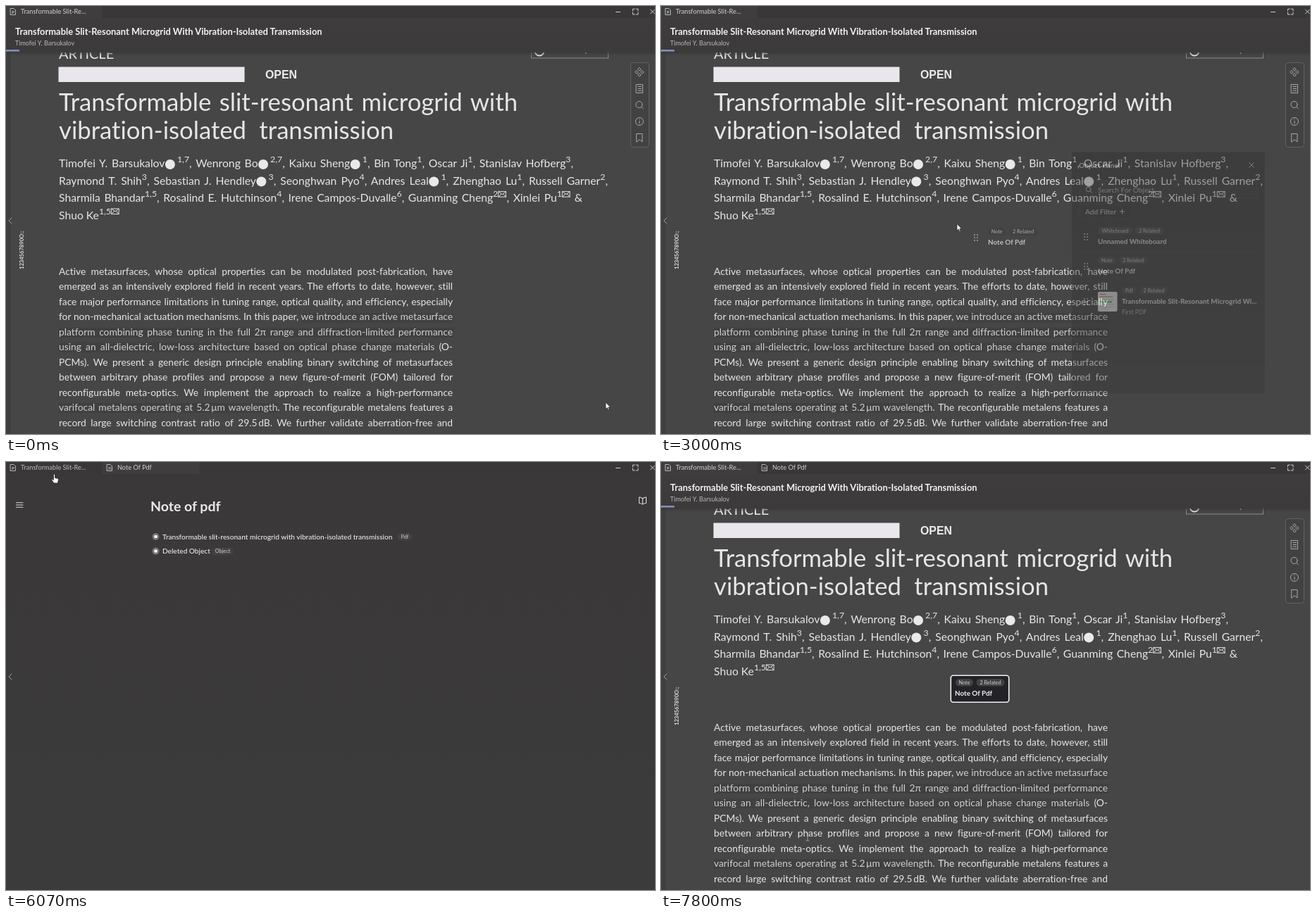
Write an HTML page that moves like this. It is 921 by 608 pixels and loops after 7.94 s.

```html
<!DOCTYPE html>
<html lang="en">
<head>
<meta charset="utf-8">
<title>Document notes</title>
<style>
  html, body { margin: 0; width: 100%; height: 100%; overflow: hidden; background: #3b393a; }
  svg { display: block; width: 100vw; height: 100vh; font-family: Lato, "Open Sans", sans-serif; font-variant-ligatures: none; }
  .line { fill: none; stroke-linecap: round; stroke-linejoin: round; }
</style>
</head>
<body>
<svg id="stage" viewBox="0 0 921 608" preserveAspectRatio="none"></svg>
<script>
const LOOP = 7940, FPS = 15;
const stage = document.getElementById('stage');
const titleCase = 'Transformable Slit-Resonant Microgrid With Vibration-Isolated Transmission';
const author = 'Timofei Y. Barsukalov';

// Drawing helpers
const text = (x, y, size, str, fill = '#e6e6e6', weight = 400, more = '') =>
  `<text x="${x}" y="${y}" font-size="${size}" fill="${fill}" font-weight="${weight}" ${more}>${str}</text>`;
const rect = (x, y, w, h, fill, more = '') =>
  `<rect x="${x}" y="${y}" width="${w}" height="${h}" fill="${fill}" ${more}/>`;
const line = (d, color = '#b4b4b4', w = 1) =>
  `<path class="line" d="${d}" stroke="${color}" stroke-width="${w}"/>`;
const circle = (x, y, r, fill) => `<circle cx="${x}" cy="${y}" r="${r}" fill="${fill}"/>`;
const group = (id, body) => `<g id="${id}">${body}</g>`;

const chip = (x, y, w, str) => rect(x, y, w, 10.5, '#434143', 'rx="5.2"') +
  text(x + w / 2, y + 7.8, 7.3, str, '#d2d2d2', 400, 'text-anchor="middle"');
const chips = (x, y, kind, w) => chip(x, y, w, kind) + chip(x + w + 4.5, y, 40, '2 Related');
const dots = (x, y) => [-4, 0, 4].map(d =>
  circle(x - 2, y + d, 1, '#c8c8c8') + circle(x + 2, y + d, 1, '#c8c8c8')).join('');
const cross = (x, y, r, color) =>
  line(`M${x - r} ${y - r}l${2 * r} ${2 * r}m0 ${-2 * r}l${-2 * r} ${2 * r}`, color);
const lens = (x, y, r, color) =>
  line(`M${x + r} ${y}a${r} ${r} 0 1 0 ${-2 * r} 0a${r} ${r} 0 1 0 ${2 * r} 0M${x + r * .7} ${y + r * .7}l2.6 2.6`, color);
const sheet = (x, y) => line(`M${x - 3.5} ${y - 4.5}h4.5l2.5 2.5v6.5h-7z`, '#c4c4c4', .9);

function paper() {
  return rect(0, 17, 921, 591, '#464646') + rect(0, 66, 7, 542, '#403f3f') +
    text(75, 75, 20, 'ARTICLE') +
    rect(745.5, 55, 109, 19, 'none', 'stroke="#8a8a8a"') +
    line('M750.5 64a6.5 6.5 0 0 0 13 0', '#e6e6e6', 2) + rect(822, 66, 1.3, 2, '#ccc') +
    rect(74.5, 86.5, 264, 21.5, '#e9e7ec') +
    text(368, 103, 15.9, 'OPEN', '#ececec', 700, 'font-family="Liberation Sans, sans-serif"') +
    rect(419, 436, 216, 14, '#000', 'opacity=".07"') +
    rect(75, 457, 560, 14, '#000', 'opacity=".09"') +
    rect(75, 478, 533, 14, '#000', 'opacity=".07"') +
    rect(75, 564, 311, 14, '#000', 'opacity=".09"') +
    group('column', '') +
    `<g transform="translate(24.5 374) rotate(-90)">${text(0, 0, 7.6, '1234567890O:;', '#dcdcdc', 700)}</g>`;
}

function sideTools() {
  const c = '#a9a9a9';
  const diamond = (x, y) => `M${x} ${y - 2.2}l2.2 2.2l-2.2 2.2l-2.2 -2.2z`;
  return rect(886.5, 80.5, 26, 120, '#434242', 'rx="4" stroke="#646363"') +
    line(diamond(899, 90) + diamond(899, 98) + diamond(895, 94) + diamond(903, 94), c) +
    line('M894.5 111.5h9v12h-9zM897 114.5h4.5M897 117.5h4.5M897 120.5h4.5', c) +
    lens(898.5, 140, 4.6, c) +
    line('M904.5 164a5.5 5.5 0 1 0-11 0a5.5 5.5 0 1 0 11 0M899 163.5v3.3M899 161v.2', c) +
    line('M895 181.5h8v11.5l-4 -3.3l-4 3.3z', c);
}

function header() {
  return rect(0, 17, 921, 49, 'url(#head)') + rect(0, 66, 921, 5, 'url(#shade)') +
    text(13, 41, 12.9, titleCase, '#f2f2f2', 700) +
    text(13, 55.5, 9, author, '#b9b7b8') +
    rect(0, 62, 19, 2.6, '#8090b8');
}

function notePage() {
  const item = (y, str) => circle(212.5, y, 5, '#777576') + circle(212.5, y, 2.3, '#fff') +
    text(222, y + 3.6, 10.1, str, '#ececec', 500);
  return rect(0, 17, 921, 591, 'url(#noteBg)') + group('noteBody',
    line('M14.5 57.7h9.5M14.5 61h9.5M14.5 64.3h9.5', '#d8d8d8', 1.1) +
    line('M903.5 52q-2-2-5-2v8.5q3 0 5 1.6q2-1.6 5-1.6v-8.5q-3 0-5 2v8', '#d8d8d8', 1.1) +
    text(205, 70, 19.5, 'Note of pdf', '#e8e8ec', 700) +
    item(106, 'Transformable slit-resonant microgrid with vibration-isolated transmission') +
    chip(555, 101, 22, 'Pdf') + item(126.6, 'Deleted Object') + chip(292, 121.5, 31, 'Object'));
}

function tabs() {
  const c = '#cfcfcf';
  return rect(0, 0, 921, 17, '#393738') + rect(0, 0, 137, 17, '#403d3e', 'id="tabLight"') +
    sheet(10, 8) + text(8.2, 11, 5.5, 'P', c, 700) +
    group('tabOne', text(21, 11.2, 9.2, 'Transformable Slit-Re...', '#d2d2d2')) +
    group('tabClose', cross(125, 8, 2.6, '#b8b8b8')) +
    group('tabTwo', sheet(147, 8) + line('M145.5 8h3.5M145.5 10h3.5', c, .8) +
      text(158, 11.2, 9.2, 'Note Of Pdf', c)) +
    line('M865.5 8.5h6', c) +
    line('M889.5 7v-2.8h2.8M894.2 4.2h2.8v2.8M897 9.2v2.8h-2.8M892.3 12h-2.8v-2.8', c) +
    cross(917.5, 8, 3, c);
}

const rowTitle = (x, y, str) => text(x, y, 9.9, str, '#efefef', 700);

function noteRow() {
  return dots(603, 370) + chips(620, 356.3, 'Note', 25.5) + rowTitle(620, 380.3, 'Note Of Pdf');
}

function panel() {
  return rect(583, 207.5, 274, 343, 'url(#panelBg)') +
    text(593, 229.5, 10.2, 'Object Panel', '#ededed', 700) + cross(838, 226, 3.4, '#d0d0d0') +
    rect(594.5, 248.5, 251.5, 25, '#353435', 'rx="3" stroke="#403f40"') +
    lens(606.5, 260.3, 3.4, '#d0d0d0') + text(620, 264.6, 10.2, 'Search For Object', '#c4c4c4') +
    rect(594.5, 281.5, 73, 21, '#2f2e2f', 'rx="3" stroke="#393839"') +
    text(602, 295.6, 10.2, 'Add Filter', '#e6e6e6') +
    line('M651.5 292h6M654.5 289v6', '#d8d8d8') +
    dots(603, 328) + chips(620, 314, 'Whiteboard', 48.5) +
    rowTitle(620, 338, 'Unnamed Whiteboard') +
    line('M594 348.8h252M594 391.2h252', '#403f40') +
    rect(594, 361, 18, 18, '#464546', 'rx="4" id="hover"') + noteRow() +
    dots(603, 420) + rect(620, 406, 27.5, 28, '#f4f4f4', 'rx="2"') +
    line('M623 409.5h8M623 413h18', '#b06a6a', 1.2) +
    line('M624 417h18M624 424h18M624 427.5h18M624 430.5h10', '#c0c0c0', .8) +
    rect(623, 419, 17, 2.5, '#52c452') +
    chips(654, 398.7, 'Pdf', 21) +
    rowTitle(654, 422.5, 'Transformable Slit-Resonant Microgrid Wi...') +
    text(654, 438, 8.5, 'First PDF', '#b8b8b8');
}

function card() {
  return rect(411.3, 303.3, 82.4, 38, '#232227', 'rx="3.5" stroke="#f1f1f3" stroke-width="1.6"') +
    chips(418, 308, 'Note', 25) + rowTitle(417, 332, 'Note Of Pdf') +
    group('cardTools', rect(463, 309, 44, 23, '#343336', 'rx="3"') +
      line('M467.5 317h6v6h-6zM470 314.5h6v6', '#c0c0c0') +
      line('M495.5 317l-5.5 3.5l5.5 3.5', '#c0c0c0') +
      circle(496, 317, 1.5, '#c0c0c0') + circle(490, 320.5, 1.5, '#c0c0c0') + circle(496, 324, 1.5, '#c0c0c0'));
}

function cursors() {
  const edge = 'fill="#fff" stroke="#222" stroke-width=".7" stroke-linejoin="round"';
  return `<g id="cursor">
    <path id="arrow" ${edge} d="M0 0v9.6l2.2-2l1.5 3.4l1.5-.6l-1.5-3.3h3z"/>
    <path id="hand" ${edge} d="M-1 1c0-1.5 2-1.5 2 0v4l3.8.9q1.4.4 1.2 1.8l-.9 3v1.8h-5.6l-2.6-3.7c-.9-1.4.5-2.2 1.3-1.4l.8.8z"/>
    <path id="beam" class="line" stroke="#b0b0b0" stroke-width=".8" d="M-2-5.3h1.4l.6.6l.6-.6h1.4M0-4.7v9.6M-2 5.4h1.4l.6-.6l.6.6h1.4"/>
  </g>`;
}

const fade = (id, a, b, more = '') =>
  `<linearGradient id="${id}" x1="0" y1="0" x2="0" y2="1"><stop stop-color="${a}" ${more}/><stop offset="1" stop-color="${b}"${more && ' stop-opacity="0"'}/></linearGradient>`;

stage.innerHTML = `<defs>${fade('head', '#3f3c3d', '#3c3a3b')}${fade('shade', '#333', '#333', 'stop-opacity=".55"')}
  ${fade('noteBg', '#3a3839', '#3c3b3c')}${fade('panelBg', '#302f30', '#393839')}</defs>` +
  group('paper', paper() + group('card', card()) + sideTools() + header() + group('panel', panel()) +
    group('ghost', noteRow())) +
  group('note', notePage()) + tabs() +
  line('M8 301l-4 4l4 4', '#a0a0a0') + cursors();

const el = {};
stage.querySelectorAll('[id]').forEach(n => el[n.id] = n);

// Set a line of type; its spaces share out what is left of the measure.
function justify(html, y, size, width) {
  el.column.insertAdjacentHTML('beforeend', text(75, y, size, html));
  const node = el.column.lastElementChild;
  const gaps = node.textContent.split(' ').length - 1;
  if (width) node.style.wordSpacing = (width - node.getComputedTextLength()) / gaps + 'px';
  return node;
}

justify('Transformable slit-resonant microgrid with', 149, 34.7, 651);
justify('vibration-isolated transmission', 188.8, 34.7, 475);

// ^ encloses superscripts, * is a round badge, @ an envelope
const BADGE = '\u2003', MAIL = '\u3000';
const raise = str => str.replace(/\*/g, BADGE).replace(/@/g, MAIL).split('^').map((part, i) =>
  part && (i % 2 ? `<tspan dy="-7" font-size="12.3">${part}</tspan>`
    : `<tspan${i ? ' dy="7"' : ''}>${part}</tspan>`)).join('');

[[author + '* ^1,7^, Wenrong Bo* ^2,7^, Kaixu Sheng* ^1^, Bin Tong^1^, Oscar Ji^1^, Stanislav Hofberg^3^,', 730],
 ['Raymond T. Shih^3^, Sebastian J. Hendley* ^3^, Seonghwan Pyo^4^, Andres Leal* ^1^, Zhenghao Lu^1^, Russell Garner^2^,', 779],
 ['Sharmila Bhandar^1,5^, Rosalind E. Hutchinson^4^, Irene Campos-Duvalle^6^, Guanming Cheng^2@^, Xinlei Pu^1@^ &amp;', 743],
 ['Shuo Ke^1,5@^', 0]
].forEach(([str, width], row) => {
  const y = 229.3 + row * 24.4;
  const node = justify(raise(str), y, 15.7, width);
  [...node.textContent].forEach((ch, i) => {
    if (ch !== BADGE && ch !== MAIL) return;
    const x = node.getStartPositionOfChar(i).x;
    el.column.insertAdjacentHTML('beforeend', ch === BADGE ? circle(x + 7.5, y - 4.3, 7, '#e9e9e9')
      : line(`M${x + .8} ${y - 14.5}h10.4v7.6h-10.4zl5.2 4l5.2-4M${x + .8} ${y - 6.9}l3.6-4M${x + 11.2} ${y - 6.9}l-3.6-4`, '#e0e0e0'));
  });
});

const soft = str => `<tspan fill="#cfcfcf">${str}</tspan>`;
['Active metasurfaces, whose optical properties can be modulated post-fabrication, have',
 'emerged as an intensively explored field in recent years. The efforts to date, however, still',
 'face major performance limitations in tuning range, optical quality, and efficiency, especially',
 'for non-mechanical actuation mechanisms. In this paper, ' + soft('we introduce an active metasurface'),
 soft('platform combining phase tuning in the full 2π range and diffraction-limited performance'),
 soft('using an all-dielectric, low-loss architecture based on optical phase change materials') + ' (O-',
 'PCMs). We present a generic design principle enabling binary switching of metasurfaces',
 'between arbitrary phase profiles and propose a new figure-of-merit (FOM) tailored for',
 'reconfigurable meta-optics. We implement the approach to realize a high-performance',
 soft('varifocal metalens operating at 5.2\u2009μm wavelength') + '. The reconfigurable metalens features a',
 'record large switching contrast ratio of 29.5\u2009dB. We further validate aberration-free and',
 'multi-depth imaging using the metalens, which represents a key experimental demonstration'
].forEach((str, i) => justify(str, 382 + i * 21.45, 13.8, 559));

// Motion: [time, value...] keys, straight between them
function at(keys, t) {
  const i = keys.findIndex(k => k[0] > t);
  if (i === 0) return keys[0].slice(1);
  if (i < 0) return keys[keys.length - 1].slice(1);
  const a = keys[i - 1], b = keys[i], p = (t - a[0]) / (b[0] - a[0]);
  return a.slice(1).map((v, n) => v + (b[n + 1] - v) * p);
}

const route = [[0, 851, 563], [200, 790, 530], [400, 660, 472], [467, 648, 465], [533, 657, 464],
  [600, 657, 464], [933, 665, 460], [1000, 665, 460], [1133, 665, 459], [1200, 665, 459],
  [1440, 632, 405], [1667, 605, 364], [1867, 605, 364], [1933, 604.5, 362], [2200, 604.5, 362],
  [2400, 612, 354], [2600, 600, 375], [2733, 603, 368], [2800, 603, 368], [2867, 555, 350],
  [2933, 480, 328], [3000, 420, 309.5], [3200, 411, 303], [3400, 411, 303], [3600, 520, 285],
  [3900, 760, 242], [4133, 833.5, 226.5], [4333, 833.5, 226.5], [4600, 610, 285], [4867, 451, 327],
  [5533, 451, 327], [5800, 190, 110], [6000, 75, 25], [6067, 68.5, 17.5], [6333, 68.5, 17.5],
  [6600, 312, 160], [7133, 470, 374.5], [7333, 208, 532.5]];
const pointer = [[0, 'arrow'], [1930, 'hand'], [2800, 'arrow'], [4195, 'hand'], [4395, 'arrow'],
  [4795, 'hand'], [5195, 'arrow'], [5990, 'hand'], [6465, 'beam']];
const panelFade = [[1867, 0], [2067, 1], [2800, 1], [3000, .4], [3333, .4], [3533, 1], [4333, 1], [4533, 0]];
const toolFade = [[4733, 0], [4933, 1], [6400, 1], [6600, .2], [6733, 0]];
const noteOpen = 5060, noteLeft = 6395;
const noteFade = [[noteOpen, 0], [5333, 1]];

const show = (node, on) => node.style.display = on ? '' : 'none';
const alpha = (node, a) => { show(node, a > 0); node.style.opacity = a; };

function draw(ms) {
  const t = Math.floor((ms + 4) * FPS / 1000) * 1000 / FPS + .1;
  const [x, y] = at(route, t);
  const inNote = t >= noteOpen && t < noteLeft;

  show(el.paper, !inNote);
  show(el.note, inNote);
  alpha(el.noteBody, at(noteFade, t)[0]);
  alpha(el.panel, at(panelFade, t)[0]);
  alpha(el.cardTools, at(toolFade, t)[0]);
  show(el.card, t >= 3400);
  show(el.hover, t >= 1930 && t < 2800);

  alpha(el.ghost, t >= 2860 && t < 3400 ? .7 : 0);
  el.ghost.setAttribute('transform', `translate(${x - 576} ${y - 350.5})`);

  show(el.tabTwo, t >= noteOpen);
  show(el.tabClose, t >= 6130 && t < 6730);
  el.tabLight.setAttribute('x', inNote ? 137 : 0);
  el.tabOne.style.opacity = inNote ? .85 : 1;

  const kind = pointer.filter(k => k[0] <= t).pop()[1];
  ['arrow', 'hand', 'beam'].forEach(id => show(el[id], id === kind));
  el.cursor.setAttribute('transform', `translate(${x} ${y})`);
}

const start = performance.now();
function tick() {
  draw((performance.now() - start) % LOOP);
  requestAnimationFrame(tick);
}
tick();
</script>
</body>
</html>
```
